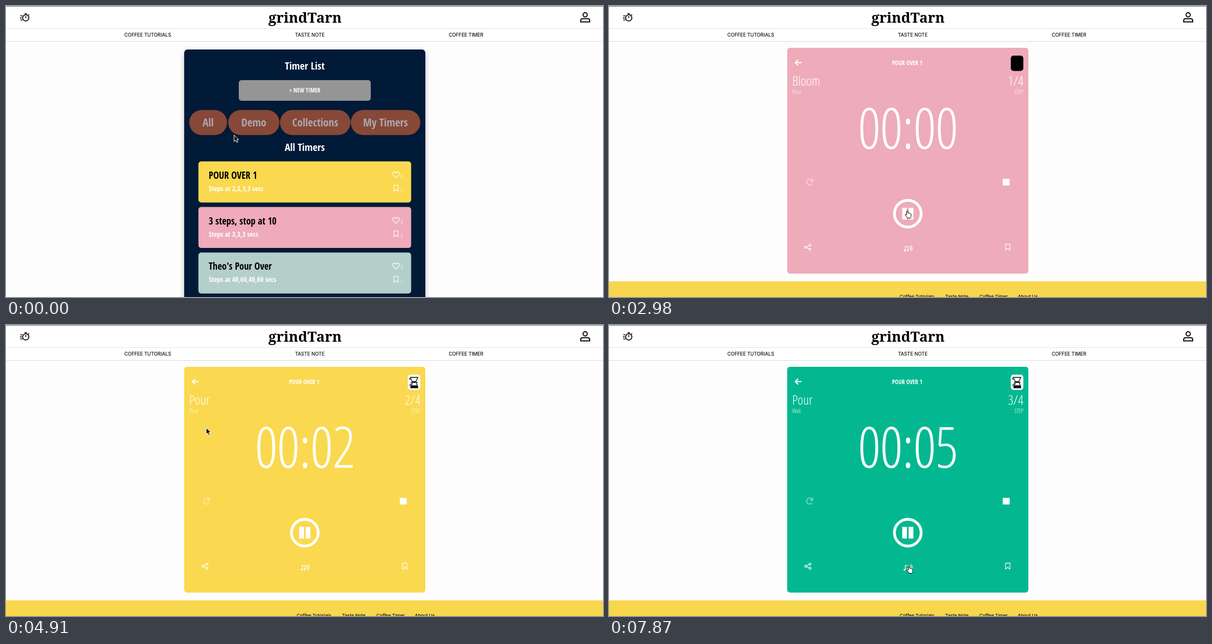
Animation, 1072 px wide and 522 px high, one loop 8 s. Source, as an HTML page:

```html
<!DOCTYPE html>
<html lang="en">
<head>
<meta charset="utf-8">
<title>Coffee timer</title>
<style>
html, body { margin: 0; width: 100%; height: 100%; overflow: hidden; background: #fdfdfd; }
svg { display: block; width: 1072px; height: 522px; }
text { font-family: "Open Sans", "Noto Sans", sans-serif; font-stretch: 75%; fill: #fff; }
.b { font-family: "Open Sans Condensed", "Noto Sans Condensed", "Noto Sans", "Open Sans", sans-serif; font-weight: 700; }
.l { font-weight: 300; }
.m { text-anchor: middle; }
.e { text-anchor: end; }
.nav { font-family: Inter, sans-serif; font-stretch: 100%; font-weight: 500; font-size: 8.6px; fill: #111; }
.foot { font-size: 8.2px; }
.brand { font-family: "Noto Serif", serif; font-stretch: 100%; font-weight: 900; font-size: 25.5px; fill: #000; }
.line { fill: none; stroke: #fff; stroke-linecap: round; stroke-linejoin: round; }
.ink { fill: none; stroke: #111; }
</style>
</head>
<body>
<svg viewBox="0 0 1072 522">
  <defs>
    <filter id="soft" x="-10%" y="-10%" width="120%" height="120%"><feGaussianBlur stdDeviation="5"/></filter>
    <path id="mark" d="M.6 .6H8.4V11.4L4.5 8.2L.6 11.4Z"/>
    <path id="heart" d="M6.5 11.4L1.5 6.3C-.6 3.8 .9 .7 3.6 .7C5 .7 6 1.5 6.5 2.6C7 1.5 8 .7 9.4 .7C12.1 .7 13.6 3.8 11.5 6.3Z"/>
  </defs>
  <rect width="1072" height="522" fill="#fdfdfd"/>

  <g id="list"></g>

  <g id="timer">
    <rect y="494" width="1072" height="28" fill="#f8d74f"/>
    <g id="links"></g>
    <rect id="card" x="320" y="75" width="433" height="405" rx="5"/>
    <path class="line" stroke-width="2" d="M345 101.500H334.500M339 97L334.500 101.500L339 106"/>
    <text class="b m" x="535.500" y="106" font-size="10.700">POUR OVER 1</text>
    <rect id="badge" x="721.500" y="89" width="22.500" height="27.500" rx="5"/>
    <g id="brewer" class="ink" stroke-width="1.300">
      <path d="M726 94H739.500L736 101.500H729.500Z M727 103H739"/>
      <path d="M729.500 104L727 112.500H739.500L737 104M728.500 106C724.500 105 724.500 110.500 727.500 110M726 98L724 95.500"/>
      <path id="water" fill="#111" d="M728 109H738.700L739.500 112.500H727Z"/>
    </g>
    <text class="l" id="stage" x="329" y="143" font-size="24"></text>
    <text class="l" id="action" x="329" y="158" font-size="10.500"></text>
    <text class="l e" id="count" x="744" y="143" font-size="24"></text>
    <text class="l e" x="744" y="158" font-size="10.500">STEP</text>
    <text class="l m" id="clock" x="536.500" y="256" font-size="102" letter-spacing="-1"></text>
    <g opacity=".42">
      <path class="line" stroke-width="2" d="M364 319.500A5.400 5.400 0 1 1 364 312"/>
      <path fill="#fff" d="M366.500 309V315.500H360Z"/>
    </g>
    <rect x="707" y="310" width="12.500" height="12" rx=".8" fill="#fff"/>
    <circle class="line" cx="536.500" cy="372.500" r="24" stroke-width="5"/>
    <path id="pause" fill="#fff" d="M526.500 362H535V383H526.500ZM538 362H546.500V383H538Z"/>
    <path id="play" fill="#fff" d="M529 361L547 372.500L529 384Z"/>
    <path class="line" stroke-width="1.200" d="M355 431.800L359.200 429.700M355 433.700L359.200 435.800"/>
    <g class="line" stroke-width="1.200">
      <circle cx="353.200" cy="432.700" r="1.800"/><circle cx="361" cy="429" r="1.800"/><circle cx="361" cy="436.500" r="1.800"/>
      <path d="M532 438.500V431.500H537.500V437.500M540.500 431.500Q542.500 434.500 540.500 437.500M542.500 429.500Q546 434.500 542.500 439.500"/>
    </g>
    <g fill="#fff"><circle cx="530.600" cy="439" r="1.700"/><circle cx="536.100" cy="438.200" r="1.700"/></g>
    <use href="#mark" class="line" x="711.500" y="426.500" stroke-width="1.100"/>
  </g>

  <path d="M0 .5H1072" stroke="#6c6c6c"/>
  <rect y="1" width="1072" height="62" fill="#fff"/>
  <path d="M0 40.500H1072" stroke="#e9e6d4"/>
  <path d="M0 63.500H1072" stroke="#dcdcdc"/>
  <g class="ink" stroke-width="1.700">
    <circle cx="35.500" cy="21.300" r="5.600"/>
    <path d="M33.500 13.700H37.500M35.500 18V21.500M40 16.500L41.500 15M25.500 17.500H29.500M25 21.300H28.500M25.500 25H29.500"/>
  </g>
  <g class="ink" stroke-width="2">
    <circle cx="1040" cy="15.800" r="3.800"/>
    <path d="M1032 28.500V26C1032 23.500 1034 22.800 1036 22.800H1044C1046 22.800 1048 23.500 1048 26V28.500Z"/>
  </g>
  <text class="brand m" x="537" y="30">grindTarn</text>
  <g id="nav"></g>

  <g id="cursor">
    <path id="arrow" fill="#000" stroke="#fff" stroke-width="1" d="M.5 .5V12L3.200 9.600L5.200 13.800L7.200 12.900L5.300 8.800H9Z"/>
    <path id="hand" fill="#fff" stroke="#000" stroke-width="1" stroke-linejoin="round"
      d="M3.500 9V2C3.500 0 5.700 0 5.700 2V5.500C6.500 4.600 7.700 5 7.800 6C8.600 5.400 9.700 5.800 9.800 6.700C10.700 6.400 11.500 7 11.500 8V10.500C11.500 12.500 10.500 13 10.500 14.500H5C4.500 12.500 2 11 .8 8.700C.3 7.500 1.800 7 2.500 8Z"/>
  </g>
</svg>
<script>
const $ = id => document.getElementById(id);
const label = (cls, x, y, size, str, extra = "") =>
  `<text class="${cls}" x="${x}" y="${y}" style="font-size:${size}px;${extra}">${str}</text>`;
const box = (x, y, w, h, r, fill, extra = "") =>
  `<rect x="${x}" y="${y}" width="${w}" height="${h}" rx="${r}" fill="${fill}" ${extra}/>`;

$("nav").innerHTML = [["COFFEE TUTORIALS", 254.5], ["TASTE NOTE", 545.5], ["COFFEE TIMER", 826]]
  .map(([s, x]) => `<text class="nav m" x="${x}" y="55">${s}</text>`).join("");
$("links").innerHTML = [["Coffee Tutorials", 553], ["Taste Note", 624.5], ["Coffee Timer", 690.5], ["About Us", 752]]
  .map(([s, x]) => `<text class="nav foot m" x="${x}" y="524">${s}</text>`).join("");

const pills = [["All", 329, 68], ["Demo", 399, 92], ["Collections", 492, 126.5], ["My Timers", 619, 125]];
const cards = [
  ["POUR OVER 1", "2,2,3,3", "#fad950", 0],
  ["3 steps, stop at 10", "3,3,3", "#efaabb", 0],
  ["Theo's Pour Over", "40,60,40,60", "#b4cfc9", 1]
];
const cardMarkup = ([name, steps, fill, saved], i) => `<g transform="translate(0 ${i * 81.7})">
  ${box(345.5, 278.8, 382, 73.6, 5, fill)}
  ${label("b", 364, 310, 17, name, "fill:#000")}
  ${label("b", 364, 332, 12.5, `Steps at ${steps} secs`)}
  <use href="#heart" class="line" x="694" y="297" stroke-width="1.200"/>
  <use href="#mark" class="line" x="696" y="321" stroke-width="1.100"/>
  ${label("l", 709, 309, 9, 0)}${label("l", 709, 334, 9, saved)}</g>`;

$("list").innerHTML =
  box(320, 82, 433, 460, 6, "#000", 'opacity=".28" filter="url(#soft)"') +
  box(320, 78, 433, 460, 6, "#001a38") +
  label("b m", 536.5, 114, 18.6, "Timer List") +
  box(418, 133, 237, 37, 5, "#959595") +
  label("b m", 536.5, 155, 10.7, "+ NEW TIMER") +
  pills.map(([s, x, w]) => box(x, 186.5, w, 45, 22.5, "#874837") +
    label("b m", x + w / 2, 216, 19.6, s, "fill:#aaa8ae")).join("") +
  label("b m", 536.5, 260, 18.6, "All Timers") +
  cards.map(cardMarkup).join("") +
  box(347, 280.5, 379, 70, 4, "none", 'id="hover" stroke="#e2661f" stroke-width="3"');

// Pointer path: tick, x, y
const path = [
  [3, 409, 231], [5, 470, 278], [7, 527, 313], [13, 527, 313], [17, 531, 366], [22, 531, 366],
  [25, 440, 240], [28, 356, 165], [32, 391, 131], [33, 359, 184], [35, 306, 215], [37, 507, 157],
  [38, 726, 139], [39, 726, 139], [41, 771, 160], [45, 685, 136], [47, 640, 190], [50, 565, 370], [53, 534, 431]
];
function pointer(n) {
  if (n <= path[0][0]) return path[0].slice(1);
  const i = path.findIndex(p => p[0] >= n);
  if (i < 0) return path[path.length - 1].slice(1);
  const [n0, x0, y0] = path[i - 1], [n1, x1, y1] = path[i];
  const k = (n - n0) / (n1 - n0);
  return [x0 + (x1 - x0) * k, y0 + (y1 - y0) * k];
}

const steps = [
  ["Bloom", "Pour", "#eeabba"],
  ["Pour", "Pour", "#fad950"],
  ["Pour", "Wait", "#03b890"]
];
const show = (id, on) => $(id).setAttribute("display", on ? "inline" : "none");

function draw(t) {
  const n = Math.floor((t + 6) / 148.6);   // the screen refreshes in even ticks
  const now = n * 148.6;
  const open = n >= 11, running = n >= 20;
  const secs = Math.max(0, Math.floor((now - 2850) / 1000));
  const step = Math.min(2, secs >> 1);
  const [stage, action, fill] = steps[step];

  show("list", !open);
  show("timer", open);
  show("hover", n >= 5);
  $("card").setAttribute("fill", fill);
  $("stage").textContent = stage;
  $("action").textContent = action;
  $("count").textContent = `${step + 1}/4`;
  $("clock").textContent = `00:0${secs}`;
  show("pause", running);
  show("play", !running);

  const loaded = n >= 21;
  $("badge").setAttribute("fill", loaded ? "#fff" : "#000");
  show("brewer", loaded);
  show("water", Math.floor((n - 33) / 7) % 2 === 0);

  const [x, y] = pointer(n);
  const hand = n >= 17 && n <= 22 || n >= 52;
  $("cursor").setAttribute("transform", `translate(${x.toFixed(1)} ${y.toFixed(1)})`);
  show("hand", hand);
  show("arrow", !hand);
}

function loop() {
  draw(performance.now() % 8000);
  requestAnimationFrame(loop);
}
loop();
</script>
</body>
</html>
```
